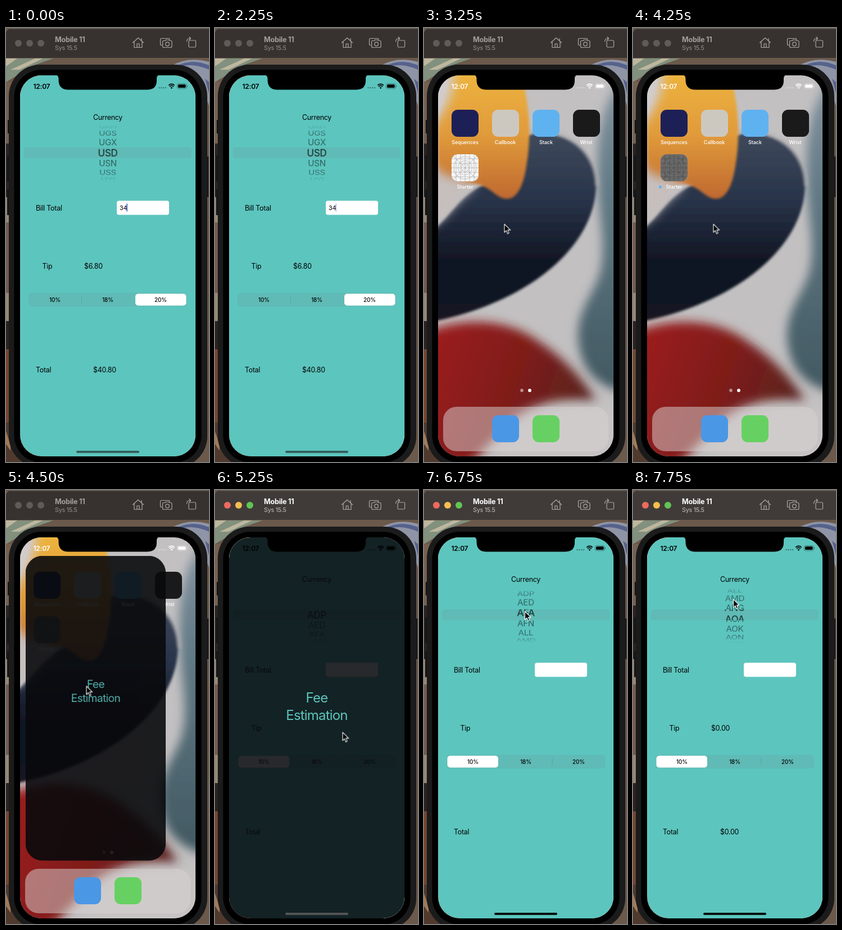
An HTML page for the animation above (8000 ms loop, 361 by 770 pixels).

```html
<!DOCTYPE html>
<html lang="en">
<head>
<meta charset="utf-8">
<title>Phone simulator</title>
<style>
  html, body { margin: 0; width: 100%; height: 100%; overflow: hidden; background: #6b594b; }
  body { position: relative; font: 12.4px Inter, "Open Sans", sans-serif; letter-spacing: -.25px; }
  svg, .screen, .launch, .app { position: absolute; left: 0; top: 0; width: 361px; height: 770px; }
  .screen, .launch { clip-path: inset(84px 24px 10px 25px round 38px); }
  .launch { background: #090a0d; transform-origin: 73px 248px; }
  .launch text { font-size: 24px; font-weight: 400; letter-spacing: -.8px; text-anchor: middle; fill: #5cc5be; }
  .app { background: #5cc5be; }
  .mid { text-anchor: middle; }
  .seg { font-size: 9.8px; font-weight: 500; text-anchor: middle; letter-spacing: -.1px; }
  .appname { font-size: 9px; font-weight: 500; letter-spacing: -.05px; text-anchor: middle; fill: #fff; }
  .line { fill: none; stroke: #aba7a4; stroke-width: 1.2; stroke-linejoin: round; stroke-linecap: round; }

  .picker { position: absolute; left: 120px; top: 172px; width: 122px; height: 100px; }
  .rows, .lens { position: absolute; inset: 0; }
  .rows { --fade: linear-gradient(transparent 0, rgba(0,0,0,.42) 14px, rgba(0,0,0,.55) 39px, transparent 40px,
          transparent 59px, rgba(0,0,0,.55) 60px, rgba(0,0,0,.42) 86px, transparent 100px);
          -webkit-mask: var(--fade); mask: var(--fade); }
  .lens { clip-path: inset(40px 0 41px); color: #10201f; }
  .lens .drum { transform: scale(1.12); }
  .drum, .wheel { position: absolute; left: 0; top: 50px; width: 100%; height: 0; transform-style: preserve-3d; }
  .wheel { top: 0; }
  .wheel span { position: absolute; left: 0; top: -10px; width: 100%; font-size: 15.2px; line-height: 20px;
                text-align: center; backface-visibility: hidden; }

  .caret, .before, .after, .result, .idle, .active, .press, .launch, .app, .status, .bar, .pointer, .spin {
    animation: 8s step-end -.03s infinite; }
  .caret { animation-name: caret; }
  .before { animation-name: before; }
  .after { animation-name: after; }
  .result { animation-name: result; }
  .idle { animation-name: idle; }
  .active { animation-name: active; }
  .press { animation-name: press; }
  .launch { animation-name: launch; }
  .app { animation-name: app; }
  .status { animation-name: status; }
  .bar { animation-name: bar; }
  .pointer { animation-name: pointer; }
  .spin { animation-name: spin; }

  @keyframes caret { 0%, 21.875% { opacity: 1 } 3.125%, 28.125% { opacity: .5 } 6.25% { opacity: .2 }
    9.375% { opacity: 0 } 15.625% { opacity: .3 } 18.75% { opacity: .7 } }
  @keyframes before { 0% { opacity: 1 } 31.25%, 100% { opacity: 0 } }
  @keyframes after { 0% { opacity: 0 } 31.25%, 100% { opacity: 1 } }
  @keyframes result { 0% { opacity: 0 } 90.625%, 100% { opacity: 1 } }
  @keyframes idle { 0% { opacity: 1 } 65.625%, 100% { opacity: 0 } }
  @keyframes active { 0% { opacity: 0 } 65.625%, 100% { opacity: 1 } }
  @keyframes press { 0% { opacity: 0 } 50%, 100% { opacity: 1 } }
  @keyframes launch { 0% { opacity: 0; transform: none } 56.25% { opacity: .9; transform: scale(.8) }
    59.375%, 100% { opacity: 1; transform: none } }
  @keyframes app { 0% { opacity: 1 } 31.25% { opacity: 0 } 65.625% { opacity: .13 } 68.75% { opacity: .97 }
    71.875%, 100% { opacity: 1 } }
  @keyframes status { 0% { color: #000 } 31.25% { color: rgba(255,255,255,.12) } 34.375% { color: #fff }
    59.375%, 100% { color: #000 } }
  @keyframes bar { 0% { fill: #35605e } 31.25% { fill: transparent } 59.375% { fill: #555 } 68.75%, 100% { fill: #06100f } }
  @keyframes pointer {
    0% { transform: translate(-40px, 331px) }
    31.25% { transform: translate(11.5px, 331px) }
    34.375% { transform: translate(70px, 338px) }
    37.5% { transform: translate(125px, 345px) }
    40.625% { transform: translate(142.5px, 347.5px) }
    59.375% { transform: translate(182px, 386px) }
    62.5% { transform: translate(226.5px, 429.5px) }
    71.875% { transform: translate(224px, 400px) }
    75% { transform: translate(205px, 300px) }
    78.125% { transform: translate(184px, 247px) }
    81.25% { transform: translate(180px, 236px) }
    84.375% { transform: translate(179px, 215px) }
    87.5% { transform: translate(178px, 200px) }
    90.625% { transform: translate(178px, 238px) }
    93.75% { transform: translate(178px, 215px) }
    96.875%, 100% { transform: translate(178px, 193.5px) } }
  @keyframes spin {
    0% { transform: rotateX(0deg) } 81.25% { transform: rotateX(16deg) } 84.375% { transform: rotateX(45deg) }
    87.5% { transform: rotateX(82deg) } 90.625% { transform: rotateX(94deg) } 93.75% { transform: rotateX(111deg) }
    96.875%, 100% { transform: rotateX(136deg) } }
</style>
</head>
<body>
<svg viewBox="0 0 361 770">
  <defs>
    <filter id="haze" x="-40%" y="-40%" width="180%" height="180%"><feGaussianBlur stdDeviation="14"/></filter>
    <filter id="soft" x="-30%" y="-30%" width="160%" height="160%"><feGaussianBlur stdDeviation="9"/></filter>
    <filter id="edge" x="-10%" y="-10%" width="120%" height="120%"><feGaussianBlur stdDeviation="2.2"/></filter>
    <linearGradient id="gold" x1="0" y1="0" x2="0" y2="1">
      <stop stop-color="#efb840"/><stop offset=".5" stop-color="#e09a3a"/><stop offset="1" stop-color="#b9602f"/>
    </linearGradient>
    <linearGradient id="navy" x1="0" y1="0" x2="0" y2="1">
      <stop stop-color="#3f4a5c"/><stop offset=".35" stop-color="#29344a"/>
      <stop offset=".7" stop-color="#0f1420"/><stop offset="1" stop-color="#131722"/>
    </linearGradient>
    <linearGradient id="red" x1="0" y1="0" x2="1" y2=".3">
      <stop stop-color="#a1201d"/><stop offset=".6" stop-color="#7f1c19"/><stop offset="1" stop-color="#5c2320"/>
    </linearGradient>
    <linearGradient id="slate" x1="0" y1="0" x2="0" y2="1">
      <stop stop-color="#8493a0"/><stop offset=".4" stop-color="#5f7883"/><stop offset="1" stop-color="#415861"/>
    </linearGradient>
    <clipPath id="glass"><rect x="25" y="84" width="312" height="676" rx="38"/></clipPath>
  </defs>

  <!-- desktop -->
  <rect width="361" height="770" fill="#6b594b"/>
  <path d="M0 54H84L50 66 0 96Z" fill="#82907e"/>
  <path d="M0 54H20L0 68ZM52 54H66L24 74H8Z" fill="#bdb79e"/>
  <path d="M0 96H14V205H0Z" fill="#77604f"/>
  <path d="M0 205H8V300H0ZM0 520H7V570H0Z" fill="#2b2321"/>
  <path d="M0 300H6V345H0ZM0 470H6V520H0Z" fill="#968672"/>
  <path d="M0 345H7V470H0Z" fill="#765a50"/>
  <path d="M0 570H7V700H0Z" fill="#74452f"/>
  <path d="M0 700H40V770H0Z" fill="#503a2e"/>
  <path d="M0 715L8 740V750L0 738Z" fill="#a07a58"/>
  <path d="M296 66Q325 50 361 60V138L348 100Z" fill="#8f95a6"/>
  <path d="M306 66Q332 54 361 66V74Q334 62 312 68ZM354 90L361 96V116Z" fill="#56628c"/>

  <!-- window bar -->
  <path d="M0 53V11Q0 1 10 1H361V53Z" fill="#373230"/>
  <path class="active" d="M0 53V11Q0 1 10 1H361V53Z" fill="#403b38"/>
  <path d="M8 1.3H361" stroke="#6d6764" stroke-width=".8"/>
  <g class="idle" fill="#605b58">
    <circle cx="22" cy="27" r="6"/><circle cx="42" cy="27" r="6"/><circle cx="62" cy="27" r="6"/>
    <text x="87" y="25" font-size="12.6" font-weight="700" fill="#a39f9c">Mobile 11</text>
    <text x="87" y="39" font-size="10.8" fill="#94908d">Sys 15.5</text>
  </g>
  <g class="active">
    <circle cx="22" cy="27" r="6" fill="#ed6a5e"/><circle cx="42" cy="27" r="6" fill="#f5bf4f"/><circle cx="62" cy="27" r="6" fill="#61c554"/>
    <text x="87" y="25" font-size="12.6" font-weight="700" fill="#fff">Mobile 11</text>
    <text x="87" y="39" font-size="10.8" fill="#c2bfbd">Sys 15.5</text>
  </g>
  <g class="line">
    <path d="M225.500 26L235 17.500 244.500 26M228 24.500V34.500H242V24.500M233 34V28H237V34M241 22V18.500"/>
    <path d="M277 30.500H276.500Q274.500 30.500 274.500 28.500V20.500Q274.500 18.500 276.500 18.500H289Q291 18.500 291 20.500"/>
    <path d="M280.500 22.500H283L284.500 21H289.500L291 22.500H293Q295 22.500 295 24.500V32.500Q295 34.500 293 34.500H280.500Q278.500 34.500 278.500 32.500V24.500Q278.500 22.500 280.500 22.500Z"/>
    <circle cx="287" cy="28.500" r="3.300"/>
    <rect x="325" y="22" width="12.500" height="12" rx="1.500"/>
    <path d="M321.500 24Q321.500 18.500 327 18.500H328.500M326 16L328.500 18.500 326 21"/>
  </g>

  <!-- phone body -->
  <path d="M3 163h3v24h-3ZM2 226h4v46h-4ZM2 286h4v46h-4ZM356 228h4v72h-4Z" fill="#151515"/>
  <rect x="5" y="65" width="353" height="715" rx="56" fill="#1b1b1c"/>
  <rect x="14.500" y="74" width="333" height="697" rx="48" fill="#000"/>

  <!-- home screen -->
  <g clip-path="url(#glass)">
    <rect x="25" y="84" width="312" height="676" fill="#c2c0c1"/>
    <path d="M370 80C318 110 306 190 309 270C311 340 324 380 314 430C304 470 272 500 274 550C278 610 310 640 370 648Z" fill="url(#slate)" filter="url(#soft)"/>
    <path d="M10 365C60 320 60 300 110 276C150 230 165 188 205 186C265 186 306 225 306 277C306 390 180 490 10 522Z" fill="url(#navy)" filter="url(#edge)"/>
    <path d="M186 184C258 176 306 220 308 280" fill="none" stroke="#b0afb2" stroke-width="9" filter="url(#edge)" opacity=".45"/>
    <path d="M52 60H165C188 120 192 190 182 245C176 285 163 303 148 303C126 303 118 276 84 277C60 282 44 300 25 322V160Z" fill="url(#gold)" filter="url(#edge)"/>
    <path d="M0 60H52Q58 108 36 145L15 180H0Z" fill="#d2cccb" filter="url(#soft)"/>
    <path d="M0 232L40 262Q78 268 92 280Q60 306 36 336L0 362Z" fill="#c6bfbd" filter="url(#soft)"/>
    <path d="M-10 545C60 512 140 514 195 550C245 582 280 618 306 662C250 656 205 660 165 690C130 720 100 760 60 790H-10Z" fill="url(#red)" filter="url(#soft)"/>
    <path d="M165 720Q240 662 365 676V790H110Z" fill="#c9c5c5" filter="url(#haze)" opacity=".75"/>
    <rect x="34" y="672" width="294" height="79" rx="24" fill="#d9d4d4" opacity=".5"/>
    <circle cx="174" cy="643" r="2.900" fill="#fff" opacity=".5"/><circle cx="188" cy="643" r="2.900" fill="#fff"/>
    <g id="tiles"></g>
    <g class="appname">
      <text x="73" y="205.500">Sequences</text><text x="144.500" y="205.500">Callbook</text>
      <text x="217" y="205.500">Stack</text><text x="288.500" y="205.500">Wrist</text><text x="73" y="284.500">Starter</text>
    </g>
    <g fill="none" stroke="#a9a9ab" stroke-width=".7">
      <path d="M49 232H97M49 240H97M49 248H97M49 256H97M49 264H97M57 224V272M65 224V272M73 224V272M81 224V272M89 224V272M52 227L94 269M94 227L52 269"/>
      <circle cx="73" cy="248" r="20"/><circle cx="73" cy="248" r="12.500"/><circle cx="73" cy="248" r="7"/>
    </g>
    <g class="press">
      <rect x="49" y="224" width="48" height="48" rx="11" fill="#000" opacity=".56"/>
      <circle cx="48.500" cy="282" r="2.600" fill="#62b4f5"/>
    </g>
  </g>
</svg>

<div class="screen">
  <div class="launch">
    <svg viewBox="0 0 361 770"><text x="181" y="377">Fee</text><text x="181" y="408">Estimation</text></svg>
  </div>
  <div class="app">
    <svg viewBox="0 0 361 770">
      <g fill="#767680" fill-opacity=".14">
        <rect x="32" y="212" width="298" height="19" rx="5"/><rect x="40" y="470" width="282" height="24" rx="6"/>
      </g>
      <rect x="197" y="306.500" width="93" height="25" rx="4" fill="#fff"/>
      <text class="mid" x="181" y="162.500">Currency</text>
      <text x="53" y="324">Bill Total</text><text x="64.500" y="427">Tip</text><text x="53" y="611">Total</text>
      <g class="before">
        <text x="202" y="323" font-size="10.800">34</text>
        <rect class="caret" x="214.500" y="311.500" width="1.500" height="14" fill="#3f5fc4"/>
        <text x="139" y="427">$6.80</text><text x="155" y="611">$40.80</text>
        <rect x="230" y="471.500" width="90.500" height="21" rx="5" fill="#fff"/>
        <path d="M134.500 476V488" stroke="#4aa8a2" stroke-width=".8"/>
      </g>
      <g class="after">
        <rect x="41.500" y="471.500" width="90.500" height="21" rx="5" fill="#fff"/>
        <path d="M228 476V488" stroke="#4aa8a2" stroke-width=".8"/>
      </g>
      <g class="result"><text x="139" y="427">$0.00</text><text x="155" y="611">$0.00</text></g>
      <g class="seg"><text x="87" y="485.500">10%</text><text x="181" y="485.500">18%</text><text x="275" y="485.500">20%</text></g>
    </svg>
    <div class="picker before" data-first="-3" data-codes="UAH UGS UGX USD USN USS UYI"></div>
    <div class="picker after" data-first="0" data-spin="spin" data-codes="ADP AED AFA AFN ALL AMD ANG AOA AOK AON AOR"></div>
  </div>
</div>

<svg viewBox="0 0 361 770">
  <path d="M88 83Q93 84 93.500 89V93Q94 109.500 111 109.500H251Q268 109.500 268 93V89Q268.500 84 273 83Z" fill="#000"/>
  <g class="status" fill="currentColor">
    <text x="48.500" y="107.500" font-size="12" font-weight="600">12:07</text>
    <g opacity=".35"><circle cx="272.500" cy="106" r="1.300"/><circle cx="276.300" cy="106" r="1.300"/><circle cx="280.100" cy="106" r="1.300"/><circle cx="283.900" cy="106" r="1.300"/></g>
    <path d="M294.500 108L292.500 105.700Q294.500 104.300 296.500 105.700Z"/>
    <path d="M290.800 103.900Q294.500 100.900 298.200 103.900M289.200 101.600Q294.500 97.300 299.800 101.600" fill="none" stroke="currentColor" stroke-width="1.600"/>
    <rect x="304.500" y="98.800" width="16.500" height="8.800" rx="2.600" fill="none" stroke="currentColor" stroke-width=".8" opacity=".5"/>
    <rect x="306" y="100.300" width="13.500" height="5.800" rx="1.500"/><path d="M322 101.800Q324 103.200 322 104.700Z" opacity=".6"/>
  </g>
  <rect class="bar" x="125" y="750" width="112" height="4" rx="2"/>
  <path class="pointer" d="M.5.500V15L3.900 11.800 6.200 17.200 8.700 16.100 6.400 10.900H11Z" fill="#000" stroke="#fff" stroke-width="1.100" stroke-linejoin="round"/>
</svg>

<script>
  const STEP = 20.5, RADIUS = 53;

  const tile = (x, y, color) => `<rect x="${x}" y="${y}" width="48" height="48" rx="11" fill="${color}"/>`;
  document.getElementById('tiles').innerHTML =
    tile(49, 145, '#1d2056') + tile(121, 145, '#cdc8bf') + tile(193, 145, '#5fb2f0') + tile(265, 145, '#1a1a1b') +
    tile(49, 224, '#f6f6f6') + tile(121, 687, '#4a97e6') + tile(193, 687, '#66d162');

  // The same drum is drawn twice: faded rows, and a magnified centre band.
  for (const picker of document.querySelectorAll('.picker')) {
    const { codes, first, spin = '' } = picker.dataset;
    const rows = codes.split(' ').map((code, i) =>
      `<span style="transform:rotateX(${-(i + +first) * STEP}deg) translateZ(${RADIUS}px)">${code}</span>`).join('');
    const drum = `<div class="drum"><div class="wheel ${spin}">${rows}</div></div>`;
    picker.innerHTML = `<div class="rows">${drum}</div><div class="lens">${drum}</div>`;
  }
</script>
</body>
</html>
```
